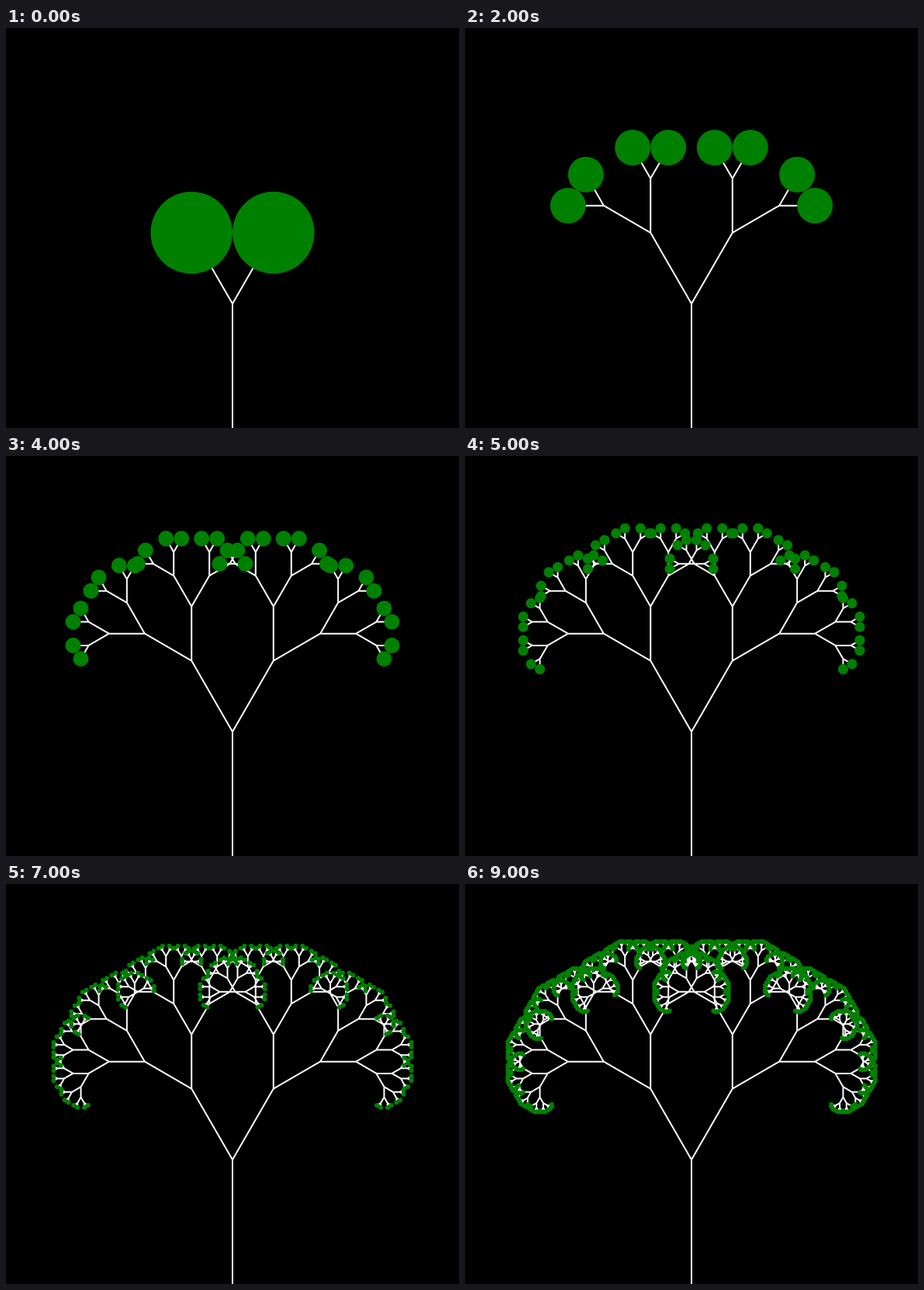
Recreate the animation shown at these times as an HTML page. Size 584 by 515 pixels, loop 10000 ms.

```html
<!DOCTYPE html>
<html lang="en">
<head>
<meta charset="utf-8">
<title>Fractal tree</title>
<style>
html, body { margin: 0; width: 100%; height: 100%; overflow: hidden; background: #000; }
svg { display: block; width: 584px; height: 515px; }
</style>
</head>
<body>
<svg viewBox="0 0 584 515">
  <path id="wood" fill="none" stroke="#fff" stroke-width="2" stroke-linecap="round"/>
  <path id="leaves" fill="green"/>
</svg>
<script>
const STEP = 1000, LEVELS = 10;
const TRUNK = 160, SHRINK = 0.66, SPREAD = Math.PI / 6, MIN_LEAF = 6;
const wood = document.getElementById('wood');
const leaves = document.getElementById('leaves');

const num = v => v.toFixed(2);
const line = b => `M${num(b.x0)} ${num(b.y0)}L${num(b.x)} ${num(b.y)}`;

function disc({ x, y, len }) {
  const r = Math.max(len, MIN_LEAF) / 2;
  const arc = `a${num(r)} ${num(r)} 0 1 1 `;
  return `M${num(x - r)} ${num(y)}${arc}${num(2 * r)} 0${arc}${num(-2 * r)} 0z`;
}

function branch(x0, y0, len, angle) {
  return { x0, y0, len, angle, x: x0 + len * Math.sin(angle), y: y0 - len * Math.cos(angle) };
}

function fork(b) {
  return [-SPREAD, SPREAD].map(turn => branch(b.x, b.y, b.len * SHRINK, b.angle + turn));
}

// Each stage adds one generation of branches, with leaves on the newest tips.
const stages = [];
let tips = [branch(292, 515, TRUNK, 0)];
let lines = tips.map(line).join('');
for (let i = 0; i < LEVELS; i++) {
  tips = tips.flatMap(fork);
  lines += tips.map(line).join('');
  stages.push({ lines, discs: tips.map(disc).join('') });
}

let shown = -1;
function draw(time) {
  const i = Math.floor(time / STEP) % LEVELS;
  if (i === shown) return;
  shown = i;
  wood.setAttribute('d', stages[i].lines);
  leaves.setAttribute('d', stages[i].discs);
}

const start = performance.now();
function tick() {
  draw(performance.now() - start);
  requestAnimationFrame(tick);
}
tick();
</script>
</body>
</html>
```
